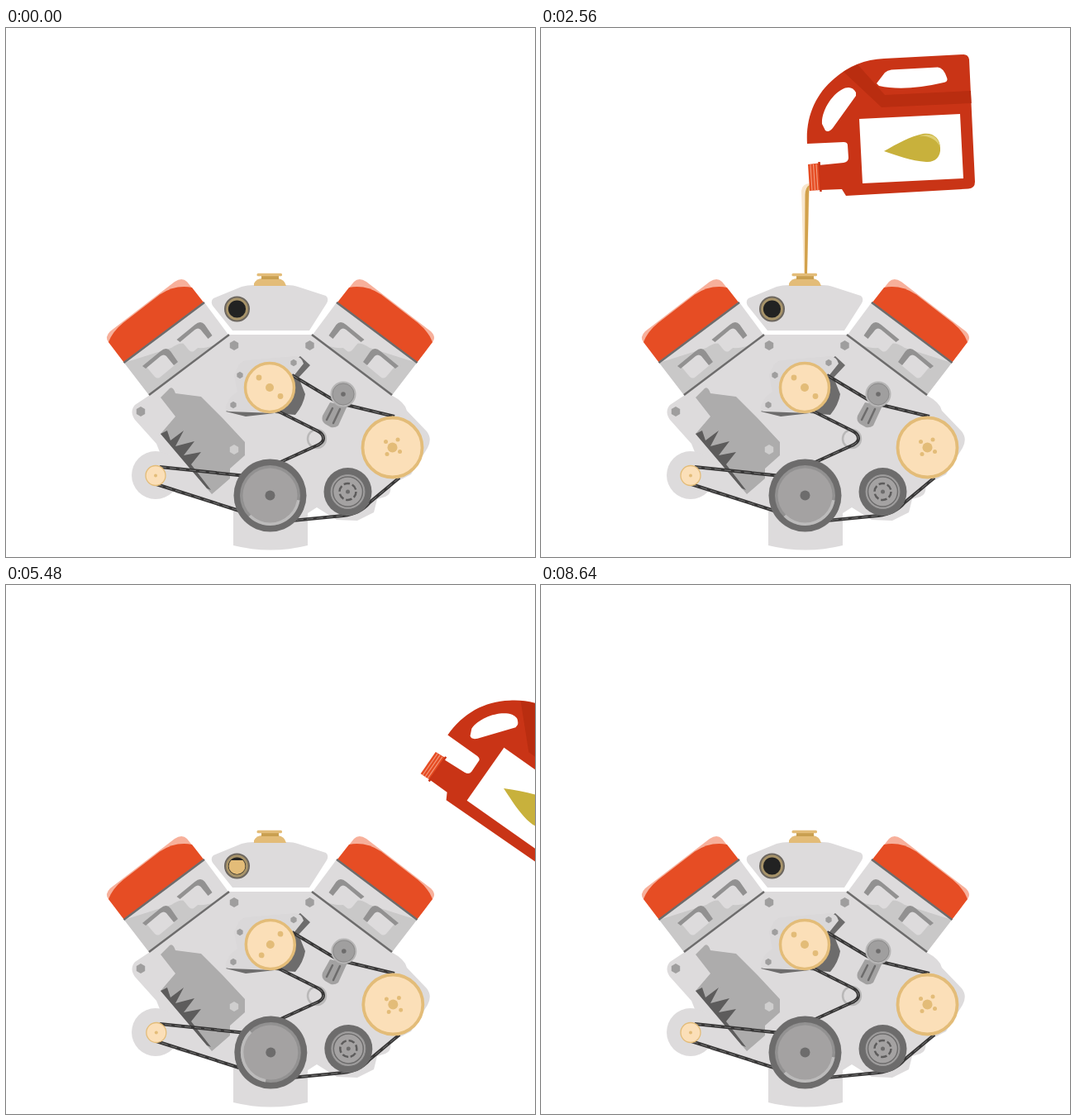
Animation of 640 by 640 pixels, one loop 9.6 s. Source, as an HTML page:

```html
<!DOCTYPE html>
<html lang="en">
<head>
<meta charset="utf-8">
<title>Engine oil change</title>
<style>
html, body { margin: 0; width: 100%; height: 100%; overflow: hidden; background: #fff; }
svg { display: block; width: 100vw; height: 100vh; }
</style>
</head>
<body>
<svg viewBox="0 0 640 640">
  <defs>
    <clipPath id="glass"><circle cx="279.5" cy="340" r="10"/></clipPath>
    <path id="hex" d="M0-6 5.2-3V3L0 6-5.2 3V-3Z"/>
    <g id="port">
      <path fill="#dddbdc" d="M170 410 188 395 195 396 204 408 187 422Q184 425 180 422Z"/>
      <path fill="#929191" d="M165 409 187 391Q194 385 199 391L208 404 203 408 194 397Q191 394 187 397L169 412Z"/>
    </g>
    <g id="head">
      <path fill="#dddbdc" d="M143 405 240 332 269 371 173 444Z"/>
      <path fill="#c9c8c8" d="M143 405 200 387Q213 377 224 385 235 390 251 384L173 444Z"/>
      <use href="#port"/>
      <use href="#port" x="41.5" y="-32"/>
      <path fill="#f7b09b" d="M124 380Q119 374 126 367L204 307Q213 301 219 307L239 332 143 405Z"/>
      <path fill="#e64d24" d="M124 380Q129 367 142 356.500L186 322.500Q205 310 225 314L239 332 143 405Z"/>
      <path stroke="#6d6c6c" stroke-width="2.5" d="M142.500 405 240 332M173 444 270 371"/>
    </g>
    <path id="run" d="M346 420 401 453 412 456 470 470M476 544 440 574Q428 588 408 590L346 596M328 463 376 487Q386 492 383.500 499 382 503 374 506L328 527M186 531 286 541.500M182 552 282 584"/>
  </defs>

  <!-- block -->
  <g fill="#dddbdc">
    <path d="M270 371H371L466 444Q483 453 485 463L509 488Q516 497 510 508L490 540 465 553Q467 564 459 567L449 570 445 586 425 596 400 595 376 580 365 587V626Q320 637 275 626V580L206 563 182 503 156 474Q149 464 156 456L174 444Z"/>
    <circle cx="181" cy="541" r="29"/>
    <path d="M250 336Q247 330 251 327L285 313Q292 311 300 311H340Q348 311 353 313L387 324Q391 327 388 333L367 366H274Z"/>
  </g>
  <use href="#head"/>
  <use href="#head" transform="matrix(-1 0 0 1 640 0)"/>

  <!-- filler cap and sight glass -->
  <path fill="#e3bc78" d="M300 312V309Q303 303 310 303H329Q337 304 339 312Z"/>
  <path fill="#c99f50" d="M309 300H330V304H309Z"/>
  <rect x="303.500" y="296.700" width="30.500" height="3.500" rx="1.500" fill="#e3bc78"/>
  <circle cx="279.500" cy="340" r="15.500" fill="#6d6760"/>
  <circle cx="279.500" cy="340" r="12" fill="#222" stroke="#a8946a" stroke-width="2.800"/>
  <rect id="level" x="269" width="21" height="22" fill="#e3bc78" clip-path="url(#glass)"/>

  <!-- brackets and bolts -->
  <path fill="#adacac" d="M187 447 198 436Q202 433 205 442L236 446 262 472 289 501V517L271 533V545L249 564 187 491 205 470Z"/>
  <path fill="#5d5c5c" d="M187 491 195 487 199 499 215 487 205 506 228 500 215 517 236 513 224 528 248 559 243 557Z"/>
  <g fill="#9f9e9e">
    <use href="#hex" x="276" y="384"/>
    <use href="#hex" x="367.500" y="384"/>
    <use href="#hex" x="163" y="464"/>
    <use href="#hex" x="276" y="510" fill="#cfcece"/>
  </g>
  <path fill="#6d6c6c" d="M266 464 290 470 325 466 350 468Q360 456 362 443L354 423 368 408 356 397Z"/>
  <path fill="#dad8d9" d="M281 409Q284 403 291 402L350 397Q358 398 360 406L348 421 345 450 325 466 270 464Q264 464 266 457L272 446 280 440 276 420Z"/>
  <g fill="#9f9e9e">
    <use href="#hex" transform="translate(348 405) scale(.7)"/>
    <use href="#hex" transform="translate(283 420) scale(.7)"/>
    <use href="#hex" transform="translate(275 456) scale(.7)"/>
  </g>
  <path fill="#a2a1a1" d="M392 453 413 457 402 481Q398 484 393 483L386 479Q381 475 383 469Z"/>
  <path stroke="#6d6c6c" stroke-width="2.500" stroke-linecap="round" d="M395 460 388 474M404 461 396 478"/>
  <circle cx="376" cy="497" r="11" fill="#dddbdc" stroke="#b9b8b8" stroke-width="2.500"/>

  <use href="#run" fill="none" stroke="#373636" stroke-width="4"/>
  <use id="belt" href="#run" fill="none" stroke="#777" stroke-width="1" stroke-dasharray="8 4"/>

  <!-- pulleys, each drawn around its own centre -->
  <g class="wheel" data-at="319 435">
    <circle r="29.500" fill="#fbdfb8" stroke="#e3bc78" stroke-width="3.500"/>
    <g fill="#e3bc78"><circle r="5"/><circle cx="13" cy="10.500" r="3.400"/><circle cx="-13" cy="-12" r="3.400"/></g>
  </g>
  <g class="wheel" data-at="467.500 507.500">
    <circle r="36" fill="#fbdfb8" stroke="#e3bc78" stroke-width="3.800"/>
    <g fill="#e3bc78"><circle r="6"/><circle cx="6.500" cy="-9.500" r="2.500"/><circle cx="9" cy="5" r="2.500"/><circle cx="-6.500" cy="8" r="2.500"/><circle cx="-8" cy="-7" r="2.500"/></g>
  </g>
  <g class="wheel" data-at="181 541.500">
    <circle r="12" fill="#fbdfb8" stroke="#e3bc78" stroke-width="1.300"/>
    <circle r="2" fill="#e3bc78"/>
  </g>
  <g class="wheel" data-at="408 443">
    <circle r="15.500" fill="#b6b5b5"/>
    <circle r="13" fill="#a09f9f" stroke="#8b8a8a"/>
    <circle r="2.800" fill="#6d6c6c"/>
  </g>
  <g class="wheel" data-at="413.500 561">
    <circle r="29" fill="#6d6c6c"/>
    <circle r="20.500" fill="#a4a2a2" stroke="#979696"/>
    <circle r="18" fill="none" stroke="#6d6c6c" stroke-width="1.500"/>
    <circle r="10" fill="none" stroke="#5d5c5c" stroke-width="2.500" stroke-dasharray="7.470 3"/>
    <circle r="2.500" fill="#6d6c6c"/>
  </g>
  <g class="wheel" data-at="319.500 565.500">
    <circle r="44" fill="#6d6c6c"/>
    <circle r="36.500" fill="#929191"/>
    <path fill="#bcbbbb" d="M0 0 36 6A36.500 36.500 0 0 1-25.800 25.800Z"/>
    <circle r="33" fill="#a4a2a2"/>
    <circle r="6" fill="#6d6c6c"/>
  </g>

  <!-- oil -->
  <g id="oil">
    <path fill="#f8e6cc" d="M326 188Q316 188 315 197L318 297H322L325 192Z"/>
    <path fill="#d2a14b" d="M325 190Q320 192 319.500 202L319 297H322L324 200Z"/>
  </g>

  <!-- canister -->
  <g id="can">
    <path fill="#c93416" d="M322 140C320 108 332 80 355 61 372 46 392 38 415 37L511 32Q517 32 518 38L525 186Q525 194 517 194.500L369 203 364 195 338 196 336 166 366 163Q372 162 372 157L371 142Q371 138 366 138Z"/>
    <path fill="#b92d10" d="M366 53 383 44 416 81 520 76 520.700 91 412 96Z"/>
    <path fill="#fff" d="M340 116C339 100 353 78 368 72.500Q377 70 381 78V82L353 121Q348 127 344 124ZM406 67 416 54Q419 51 424 50.500L480 47.500Q487 48 491 60 493 65 487 66 440 77 409 70ZM385 110 507 104 511 182 389 188Z"/>
    <path fill="#c8b13c" d="M415 149C431 140 447 131 462 128 475 126 483 134 483 145 484 156 476 163 466 162 448 161 430 154 415 149Z"/>
    <path fill="#dfcf74" d="M457 130.500Q479 124 483 144 476 130 457 130.500Z"/>
    <path fill="#e64d24" d="M323 165 336 163.500 338 196 325 197Z"/>
    <path stroke="#f4a085" d="M326 165 328 197M329.500 165 331.500 196.500M333 164.500 335 196.500"/>
    <path stroke="#c93416" stroke-width="2.500" d="M336.500 162 338.500 198"/>
  </g>
</svg>
<script>
const $ = s => document.querySelector(s);
const wheels = [...document.querySelectorAll('.wheel')];
const LOOP = 9600, OFF = 0.4;   // OFF: slight eccentricity of the axles

const ramp = (t, a, b) => Math.min(1, Math.max(0, (t - a) / (b - a)));
const set = (el, name, value) => el.setAttribute(name, value);
const scaleAt = (x, y, k) => `translate(${x} ${y}) scale(${k}) translate(${-x} ${-y})`;

function drawCan(t) {
  let x, y, turn;
  if (t < 4400) {
    const s = ramp(t, 480, 1530), left = (1 - s) ** 3.1;
    [x, y, turn] = [242 * left, 76 * left, 90 * (1 - s)];
  } else {
    const p = ((t - 4400) / 720) ** 1.75;
    [x, y, turn] = [89.5 * p, 58 * p, 18.7 * p];
  }
  const can = $('#can');
  can.style.display = t >= 480 && t < 5900 ? '' : 'none';
  set(can, 'transform', `translate(${x} ${y}) rotate(${turn} 448 146)`);
}

function drawOil(t) {
  const grow = 1 - (1 - ramp(t, 1480, 2560)) ** 3;
  const fade = 1 - ramp(t, 4400, 5200);
  set($('#oil'), 'transform', t < 4400 ? scaleAt(325, 189, grow) : scaleAt(320, 298, fade));
  set($('#level'), 'y', 351 - 18 * ramp(t, 3400, 5320) + 18 * ramp(t, 6400, 8130));
}

function drawWheels(t) {
  const angle = 1080 * ramp(t, 5190, 8640);
  for (const w of wheels) {
    const [x, y] = w.dataset.at.split(' ').map(Number);
    set(w, 'transform', `translate(${x + OFF} ${y + OFF}) rotate(${angle}) translate(${-OFF} ${-OFF})`);
  }
  set($('#belt'), 'stroke-dashoffset', -angle / 3);
}

function frame(now) {
  const t = Math.floor(now % LOOP / 40) * 40;
  drawCan(t);
  drawOil(t);
  drawWheels(t);
  requestAnimationFrame(frame);
}
frame(performance.now());
</script>
</body>
</html>
```
